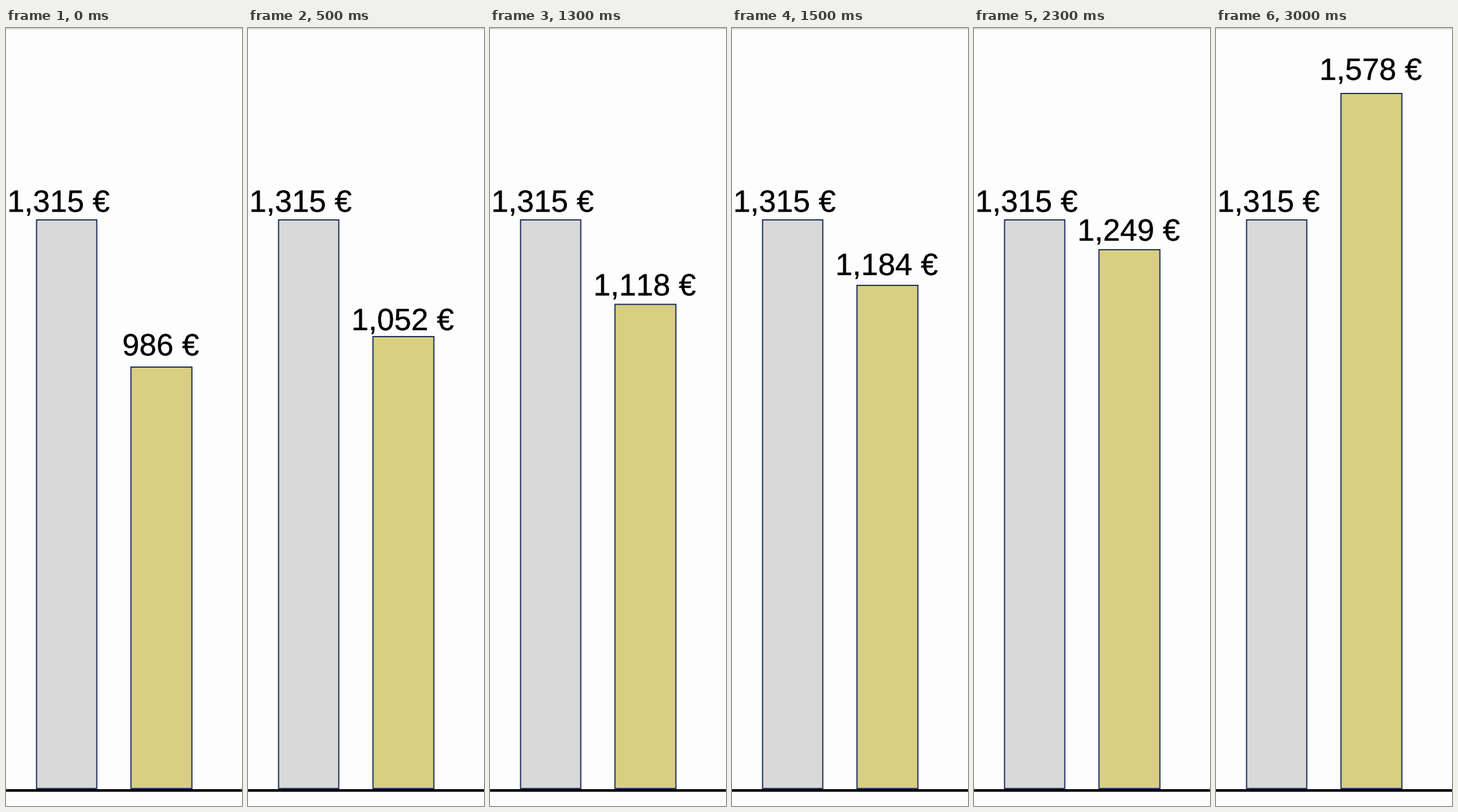
Write a matplotlib script that moves like this. It is 365x1200 px and loops after 3500 ms.

```python
import matplotlib.pyplot as plt
from matplotlib.animation import FuncAnimation
from matplotlib.patches import PathPatch, Rectangle
from matplotlib.textpath import TextPath
from matplotlib.transforms import Affine2D

W, H, DPI = 365, 1200, 100
PX = 72 / DPI
FONT_SIZE = 47.5
BASE_VALUE = 1315
FLOOR = 1173

# share of the base value in percent, bar top, label baseline
STEPS = [
    (75, 523, 505),
    (80, 476, 466),
    (85, 426.3, 412.5),
    (90, 397, 381),
    (95, 342, 328),
    (100, 300, 283.5),
    (120, 101, 80),
]

plt.rcParams["text.kerning_factor"] = 8  # evenly spaced figures

fig = plt.figure(figsize=(W / DPI, H / DPI), dpi=DPI, facecolor="#fdfdfd")
ax = fig.add_axes([0, 0, 1, 1])
ax.set(xlim=(0, W), ylim=(H, 0))
ax.axis("off")


def add_bar(left, right, top, color):
    bar = Rectangle((left, top), right - left, FLOOR - top, facecolor=color,
                    edgecolor="#22335c", linewidth=1.9 * PX, snap=False)
    return ax.add_patch(bar)


def label_path(text, x, baseline):
    glyphs = TextPath((0, 0), text, size=FONT_SIZE,
                      prop={"family": "Liberation Sans"})
    return Affine2D().scale(1, -1).translate(x, baseline).transform_path(glyphs)


def add_label(text, x, baseline):
    label = PathPatch(label_path(text, x, baseline), facecolor="black",
                      edgecolor="black", linewidth=0.4 * PX, snap=False)
    return ax.add_patch(label)


def add_band(y, height, color):
    ax.add_patch(Rectangle((0, y), W, height, color=color, linewidth=0))


add_band(0, 2, "#d4d4d4")
add_bar(47.3, 140.4, 296, "#d9d9d9")
add_label(f"{BASE_VALUE:,} €", 2, 283.5)
bar = add_bar(193.3, 287.5, STEPS[0][1], "#d9cf82")
label = add_label("0", 0, 0)
add_band(1173.5, 4.5, "black")


def update(frame):
    percent, top, baseline = STEPS[frame]
    value = round(BASE_VALUE * percent / 100)
    if percent == 100:
        text, x = f"{value:,}€", 174.5
    else:
        text, x = f"{value:,} €", 160 if value >= 1000 else 179.8
    bar.set_y(top)
    bar.set_height(FLOOR - top)
    label.set_path(label_path(text, x, baseline))
    return bar, label


anim = FuncAnimation(fig, update, frames=len(STEPS), interval=500,
                     repeat=True, repeat_delay=0)
plt.show()
```
